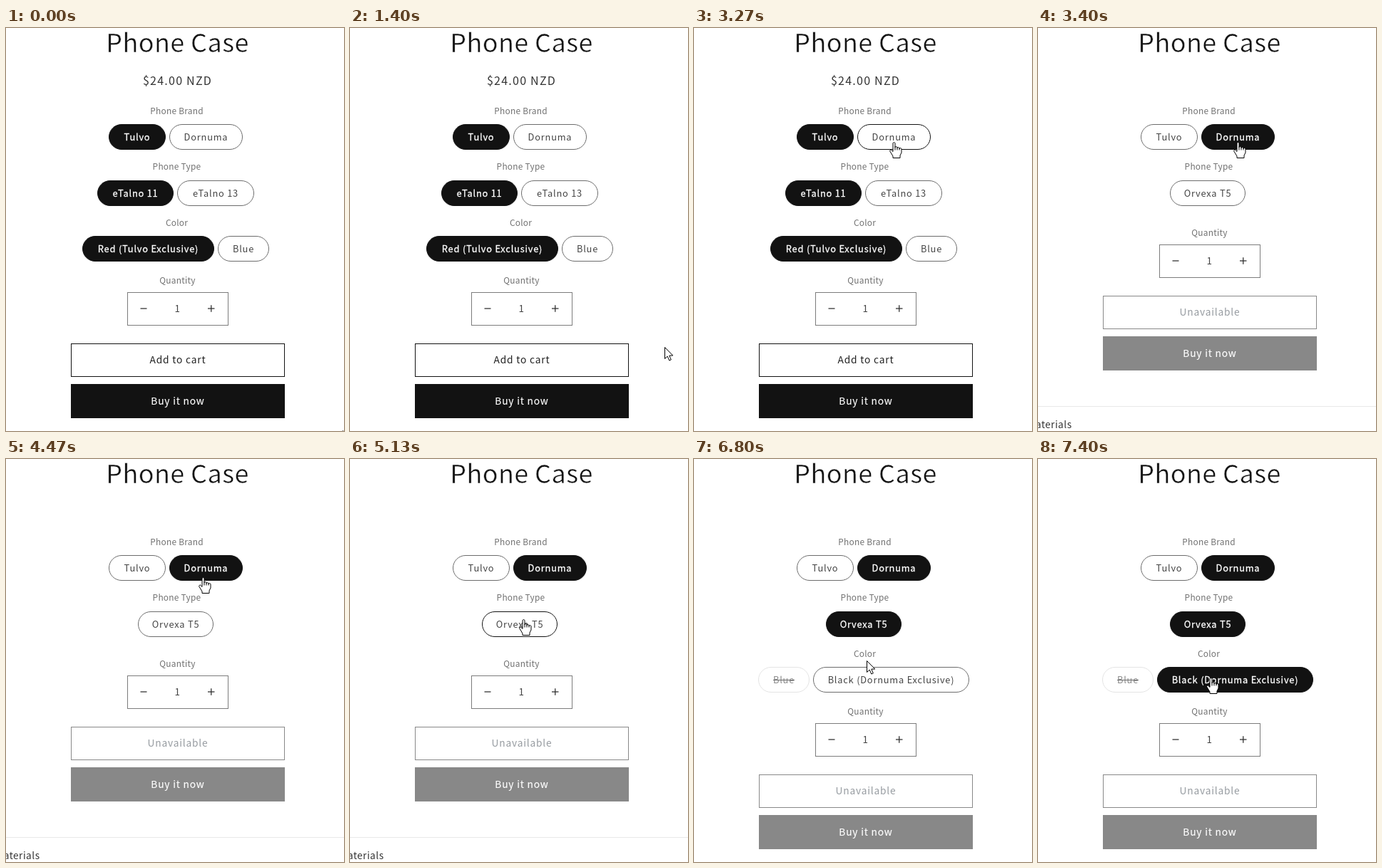
These frames come from a looping animation (474 px wide and 566 px high, 8 s). An HTML page with a canvas:

```html
<!DOCTYPE html>
<html lang="en">
<head>
<meta charset="utf-8">
<title>Phone Case</title>
<style>
html, body { margin: 0; width: 100%; height: 100%; overflow: hidden; background: #fff; }
canvas { display: block; width: 474px; height: 566px; }
</style>
</head>
<body>
<canvas id="stage" width="474" height="566"></canvas>
<script>
const ctx = document.getElementById('stage').getContext('2d');
const FONT = '"Noto Sans CJK SC", "Noto Sans CJK JP", "Noto Sans CJK", "Noto Sans", sans-serif';
const INK = '#121212', SOFT = '#444', GREY = '#707070', OFF = '#888';
const LOOP = 8000, TICK = 1000 / 15;
const MID = 240.5, ROW_MID = 238, ROW_STEP = 78.5, GAP = 5, PILL_H = 36;

// Ticks at which the selected options change
const BRAND = 51, TYPE = 82, COLOR = 111;

const START = { x: 472.5, y: 565 };
const moves = [
  { from: 12, to: 18, x: 453, y: 468 },
  { from: 20, to: 33, x: 328.5, y: 259.5 },
  { from: 33, to: 43, x: 280, y: 160 },
  { from: 66, to: 78, x: 242, y: 229 },
  { from: 95, to: 106, x: 242, y: 307 }
];

function pointerAt(k) {
  let { x, y } = START;
  for (const m of moves) {
    const u = Math.min(1, Math.max(0, (k - m.from) / (m.to - m.from)));
    const e = 1 - (1 - u) ** 1.2;
    x += (m.x - x) * e;
    y += (m.y - y) * e;
  }
  return { x, y };
}

function rowsAt(k) {
  const first = k < BRAND;
  const rows = [{
    label: 'Phone Brand',
    pills: [{ s: 'Tulvo', w: 80, on: first }, { s: 'Dornuma', w: 103, on: !first }]
  }, {
    label: 'Phone Type',
    pills: first
      ? [{ s: 'eTalno 11', w: 107, on: true }, { s: 'eTalno 13', w: 108 }]
      : [{ s: 'Orvexa T5', w: 106, on: k >= TYPE }]
  }];
  if (first || k >= TYPE) rows.push({
    label: 'Color',
    pills: first
      ? [{ s: 'Red (Tulvo Exclusive)', w: 185, on: true }, { s: 'Blue', w: 72 }]
      : [{ s: 'Blue', w: 72, off: true }, { s: 'Black (Dornuma Exclusive)', w: 219, on: k >= COLOR }]
  });
  rows.forEach((row, i) => {
    const total = row.pills.reduce((sum, p) => sum + p.w + GAP, -GAP);
    let x = ROW_MID - total / 2;
    for (const p of row.pills) {
      p.x = x;
      p.y = Math.round(135 + i * ROW_STEP);
      x += p.w + GAP;
    }
  });
  return rows;
}

function inside(p, at) {
  return at.x >= p.x && at.x < p.x + p.w && at.y >= p.y && at.y < p.y + PILL_H;
}

// Border emphasis, fading over a few ticks once the pointer has left
function hover(p, k) {
  const fade = 5;
  for (let j = 0; j < fade; j++) if (inside(p, pointerAt(k - j))) return 1 - j / fade;
  return 0;
}

// A positive weight thickens the glyphs, a negative one thins them on white
function text(s, x, y, size, gap, color, weight = 0, align = 'center') {
  ctx.font = `400 ${size}px ${FONT}`;
  ctx.letterSpacing = gap + 'px';
  ctx.textAlign = align;
  ctx.fillStyle = color;
  ctx.fillText(s, x, y);
  if (weight) {
    ctx.lineWidth = Math.abs(weight);
    ctx.strokeStyle = weight > 0 ? color : '#fff';
    ctx.strokeText(s, x, y);
  }
}

function label(s, x, y) {
  text(s, x, y, 11.9, .25, GREY);
}

function box(x, y, w, h, color) {
  ctx.strokeStyle = color;
  ctx.lineWidth = 1;
  ctx.strokeRect(x + .5, y + .5, w - 1, h - 1);
}

function line(x0, y0, x1, y1, color, width = 1) {
  ctx.strokeStyle = color;
  ctx.lineWidth = width;
  ctx.beginPath();
  ctx.moveTo(x0, y0);
  ctx.lineTo(x1, y1);
  ctx.stroke();
}

function pill(p, k) {
  const shade = Math.round(108 - 90 * hover(p, k));
  ctx.beginPath();
  ctx.roundRect(p.x + .5, p.y + .5, p.w - 1, PILL_H - 1, PILL_H / 2);
  ctx.fillStyle = p.on ? INK : '#fff';
  ctx.fill();
  ctx.lineWidth = 1;
  ctx.strokeStyle = p.on ? INK : p.off ? '#e4e4e4' : `rgb(${shade},${shade},${shade})`;
  ctx.stroke();
  const mid = p.x + p.w / 2;
  text(p.s, mid, p.y + 23, 12.8, .8, p.on ? '#fff' : p.off ? OFF : SOFT, p.on ? .3 : 0);
  if (p.off) line(mid - 15, p.y + 18.5, mid + 15, p.y + 18.5, GREY);
}

function paint() {
  ctx.closePath();
  ctx.fillStyle = '#fff';
  ctx.fill();
  ctx.strokeStyle = '#000';
  ctx.lineWidth = 1;
  ctx.stroke();
}

function arrow() {
  ctx.beginPath();
  ctx.moveTo(0, 0);
  ctx.lineTo(0, 16);
  ctx.lineTo(3.7, 12.6);
  ctx.lineTo(6.3, 18.5);
  ctx.lineTo(8.8, 17.4);
  ctx.lineTo(6.3, 11.6);
  ctx.lineTo(11.3, 11.5);
  paint();
}

function hand() {
  const top = i => i ? 5 + i : 0;
  ctx.beginPath();
  ctx.moveTo(-1.5, 13);
  for (let i = 0; i < 4; i++) {
    const x = 3 * i, y = top(i);
    ctx.lineTo(x - 1.5, y + 1);
    ctx.quadraticCurveTo(x, y - 1, x + 1.5, y + 1);
  }
  ctx.lineTo(10.5, 14.5);
  ctx.lineTo(8.5, 18.5);
  ctx.lineTo(8.5, 22);
  ctx.lineTo(-1.5, 22);
  ctx.lineTo(-1.5, 19.5);
  ctx.lineTo(-6, 12);
  ctx.lineTo(-4.4, 10.2);
  paint();
  for (let i = 1; i < 4; i++) line(3 * i - 1.5, top(i), 3 * i - 1.5, 11, '#000');
}

function pointer(pills, k) {
  const at = pointerAt(k);
  ctx.save();
  ctx.translate(Math.floor(at.x) + .5, Math.floor(at.y) + .5);
  pills.some(p => !p.off && inside(p, at)) ? hand() : arrow();
  ctx.restore();
}

function order(available) {
  const main = available ? INK : OFF;
  label('Quantity', MID, 359);
  box(170, 371, 142, 47, '#7c7c7c');
  line(188.5, 394, 197.5, 394, '#333', 1.3);
  line(283, 394, 292.5, 394, '#333', 1.3);
  line(287.75, 389.25, 287.75, 398.75, '#333', 1.3);
  text('1', MID, 399, 13.4, .4, SOFT);

  box(91, 443, 300, 47, main);
  text(available ? 'Add to cart' : 'Unavailable', 241, 471, 13.75, .8,
    available ? '#222' : '#969ba0');
  ctx.fillStyle = main;
  ctx.fillRect(91, 500, 300, 48);
  text('Buy it now', 241, 529, 13.75, .8, '#fff', .15);
}

function draw(t) {
  const k = Math.floor((t + 5) / TICK);
  const available = k < BRAND;
  const rows = rowsAt(k), compact = rows.length < 3;

  ctx.fillStyle = '#fff';
  ctx.fillRect(0, 0, 474, 566);
  text('Phone Case', MID, 34, 36, .4, INK, -.5);
  if (available) text('$24.00 NZD', MID, 80, 16.1, 1.2, '#333');

  rows.forEach((row, i) => {
    label(row.label, MID - 1, Math.floor(121 + i * ROW_STEP));
    row.pills.forEach(p => pill(p, k));
  });

  ctx.save();
  if (compact) ctx.translate(0, -67);
  order(available);
  ctx.restore();

  if (compact) {
    line(0, 531.5, 474, 531.5, '#e9e9e9');
    text('Materials', 47.5, 562, 13.6, .5, '#333', 0, 'right');
  }
  pointer(rows.flatMap(row => row.pills), k);
}

function frame(now) {
  draw(now % LOOP);
  requestAnimationFrame(frame);
}
requestAnimationFrame(frame);
</script>
</body>
</html>
```
